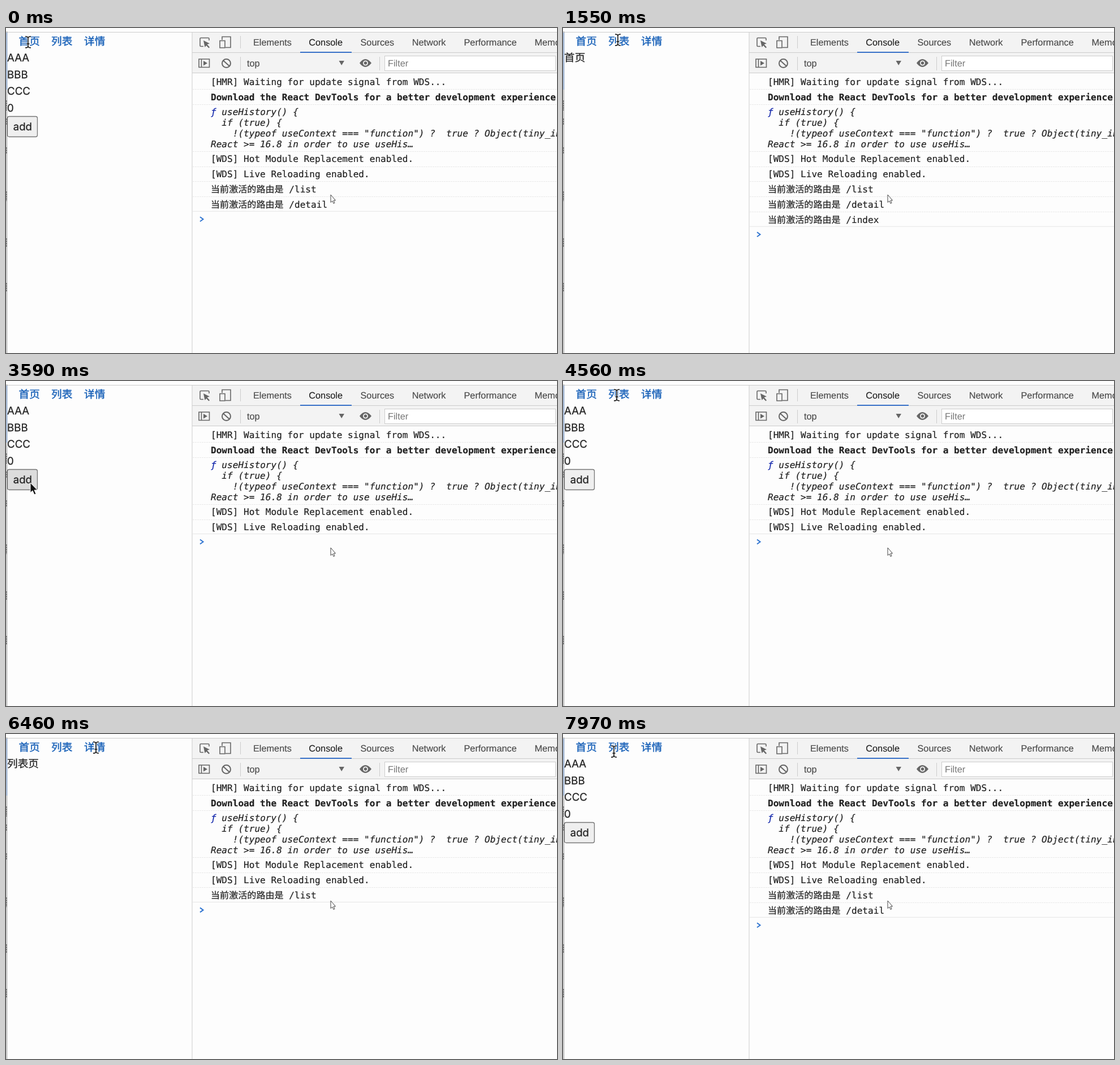
Recreate the animation shown at these times as an HTML page. Size 974 px wide and 575 px high, loop 8000 ms.

```html
<!DOCTYPE html>
<html lang="zh-CN">
<head>
<meta charset="utf-8">
<title>Router console</title>
<style>
html, body { margin: 0; width: 100%; height: 100%; overflow: hidden; background: #fdfdfd; }
svg { display: block; }
text { white-space: pre; fill: #222; text-rendering: geometricPrecision; }
.page { font: 18.67px Inter, "Noto Sans CJK SC", sans-serif; }
.page text { stroke: #222; stroke-width: .25; }
.link text { fill: #1861b8; stroke: #1861b8; stroke-width: .4; }
.ui { font: 16.3px "Liberation Sans", Arial, sans-serif; }
.ui text { fill: #4a4a4a; stroke: #4a4a4a; stroke-width: .15; }
.ui .on { fill: #222; stroke: #222; }
.ui .hint { fill: #777; stroke: none; }
.mono { font: 16.08px "DejaVu Sans Mono", "Noto Sans CJK SC", monospace; }
.mono text { stroke: #222; stroke-width: .2; }
.it { font-style: italic; }
.icon { fill: none; stroke: #666; stroke-width: 1.6; }
.sep { stroke: #e9e9e9; stroke-dasharray: 3 1; }
.rule { stroke: #ccc; }
</style>
</head>
<body>
<svg width="974" height="575" viewBox="0 0 974 575">
  <rect width="974" height="575" fill="#fdfdfd"/>
  <rect x="329" y="8" width="645" height="72" fill="#f3f3f3"/>
  <path class="rule" d="M1 7.5H974M329 8V575M329 43.5H974M329 79.5H974M414.5 14V36M414.5 51V75M660.5 51V75"/>
  <path d="M1.5 6V575" stroke="#8c8c8c"/>
  <path d="M1.5 8V109" stroke="#3f6aa5"/>
  <path d="M1 128V146M1 160V171M1 211V222M1 289V306M1 372V388M1 451V466" stroke="#333" stroke-dasharray="3 1"/>

  <g class="page link">
    <text x="22.5" y="29.5">首页</text><text x="80" y="29.5">列表</text><text x="138" y="29.5">详情</text>
  </g>
  <g class="page">
    <text id="title" x="2" y="59.3"></text>
    <g id="detail">
      <text x="2" y="59.3">AAA</text><text x="2" y="88.6">BBB</text><text x="2" y="118">CCC</text><text x="2" y="147.5">0</text>
      <rect id="button" x="2.5" y="156.5" width="53" height="36" rx="3" stroke="#767676" stroke-width="1.3"/>
      <text x="12.7" y="181">add</text>
    </g>
  </g>

  <g class="ui">
    <text x="437" y="31">Elements</text><text class="on" x="535.3" y="31">Console</text>
    <text x="626.5" y="31">Sources</text><text x="717.8" y="31">Network</text>
    <text x="809.5" y="31">Performance</text><text x="934.5" y="31">Memory</text>
    <rect x="520" y="42" width="91" height="2" fill="#3871c8"/>
    <rect x="669.5" y="49.5" width="302" height="26" fill="#fff" stroke="#ccc"/>
    <text x="426" y="67.5">top</text><text class="hint" x="675" y="68.2">Filter</text>
    <path d="M588.5 58H598L593.2 66Z" fill="#666"/>
  </g>
  <g class="icon">
    <path d="M349 32.5H344.5Q343 32.5 343 31V19Q343 17.5 344.5 17.5H357.5Q359 17.5 359 19V22"/>
    <path d="M349 22L360 27.5 355.5 29 360 34 358.5 35.5 354 31 351.5 34Z" fill="#666" stroke="none"/>
    <path d="M382 21V15.5H397V34.5H388M378 22.5H387V35H378Z"/>
    <path d="M341 55H359.5V69.5H341ZM345.5 55V69.5"/>
    <path d="M349 58L356 62.3 349 66.5Z" fill="#666" stroke="none"/>
    <circle cx="389.5" cy="62.5" r="7.5" stroke-width="2"/><path d="M384 57.5L395 67.5" stroke-width="2"/>
    <path d="M625 62Q635 48 646 62Q635 76 625 62Z" fill="#666" stroke="none"/>
    <circle cx="635.5" cy="62" r="4.5" fill="#f3f3f3" stroke="none"/><circle cx="635.5" cy="62" r="2.7" fill="#666" stroke="none"/>
  </g>

  <path class="sep" d="M330 108.5H974M330 135.5H974M330 218.5H974M330 245.5H974"/>
  <g class="mono">
    <text x="362" y="101">[HMR] Waiting for update signal from WDS...</text>
    <text x="362" y="128" font-weight="bold">Download the React DevTools for a better development experience:</text>
    <g class="it">
      <text x="362" y="154"><tspan fill="#0d22aa" stroke="#0d22aa">ƒ</tspan> useHistory() {</text>
      <text x="362" y="173">  if (true) {</text>
      <text x="362" y="192">    !(typeof useContext === "function") ?  true ? Object(tiny_invariant</text>
      <text x="362" y="211">React &gt;= 16.8 in order to use useHis…</text>
    </g>
    <text x="362" y="237.4">[WDS] Hot Module Replacement enabled.</text>
    <text x="362" y="264.3">[WDS] Live Reloading enabled.</text>
    <g id="log"></g>
  </g>
  <g id="prompt">
    <path d="M330 -14H974" stroke="#e6e6e6"/>
    <path d="M343 -4L348.5 0 343 4" fill="none" stroke="#2f74d0" stroke-width="2"/>
  </g>

  <path d="M574 295V308.5L577 306 579 310.5 581 309.5 579 305H582.5Z" fill="#fff" stroke="#444"/>
  <path id="arrow" d="M0 0V17.5L4 14 7 21 10 19.7 7 13H12.5Z" fill="#111" stroke="#fff"/>
  <g id="beam" fill="none">
    <path d="M-5 -10Q0 -10 0 -7Q0 -10 5 -10M0 -8V8M-5 10Q0 10 0 7Q0 10 5 10M-2.5 3H2.5" stroke="#fff" stroke-width="3.5"/>
    <path d="M-5 -10Q0 -10 0 -7Q0 -10 5 -10M0 -8V8M-5 10Q0 10 0 7Q0 10 5 10M-2.5 3H2.5" stroke="#111" stroke-width="1.6"/>
  </g>
</svg>
<script>
const $ = id => document.getElementById(id);
const LOOP = 8000, PITCH = 26.9;

// start time, page, logged routes
const states = [
  [0, 'detail', ['list', 'detail']],
  [700, 'index', ['list', 'detail', 'index']],
  [1960, 'list', ['list', 'detail', 'index', 'list']],
  [3450, 'detail', []],
  [5250, 'list', ['list']],
  [6900, 'detail', ['list', 'detail']]
];
const titles = { index: '首页', list: '列表页', detail: '' };

// time, x, y of the pointer
const path = [
  [0, 39, 25], [800, 39, 25], [1450, 97, 21], [2000, 97, 21], [2400, 110, -25],
  [3449, 110, -25], [3450, 43, 180], [3850, 43, 180], [4480, 95, 25],
  [5450, 95, 25], [6200, 159, 24], [7250, 159, 24], [7970, 90, 31], [8000, 90, 31]
];

function pointer(t) {
  const i = path.findIndex(p => p[0] > t);
  const [t0, x0, y0] = path[i - 1], [t1, x1, y1] = path[i];
  const u = (t - t0) / (t1 - t0), e = u * u * (3 - 2 * u);
  return [x0 + (x1 - x0) * e, y0 + (y1 - y0) * e];
}

const show = (el, on) => el.setAttribute('visibility', on ? 'visible' : 'hidden');
let current;

function setState(state) {
  const [, page, routes] = current = state;
  $('title').textContent = titles[page];
  show($('detail'), page === 'detail');
  $('log').innerHTML = routes.map((route, i) => {
    const y = i * PITCH;
    return `<path class="sep" d="M330 ${271.5 + y}H974"/>
      <text x="362" y="${291 + y}">当前激活的路由是 /${route}</text>`;
  }).join('');
  $('prompt').setAttribute('transform', `translate(0 ${284.5 + routes.length * PITCH})`);
}

function draw(now) {
  const t = now % LOOP;
  const state = states.findLast(s => s[0] <= t);
  if (state !== current) setState(state);

  const [x, y] = pointer(t), overText = y < 42;
  for (const id of ['arrow', 'beam']) {
    $(id).setAttribute('transform', `translate(${x} ${y})`);
    show($(id), (id === 'beam') === overText);
  }
  const hover = x < 56 && y > 156 && y < 193;
  $('button').setAttribute('fill', hover ? '#dcdcdc' : '#efefef');
  requestAnimationFrame(draw);
}
requestAnimationFrame(draw);
</script>
</body>
</html>
```
